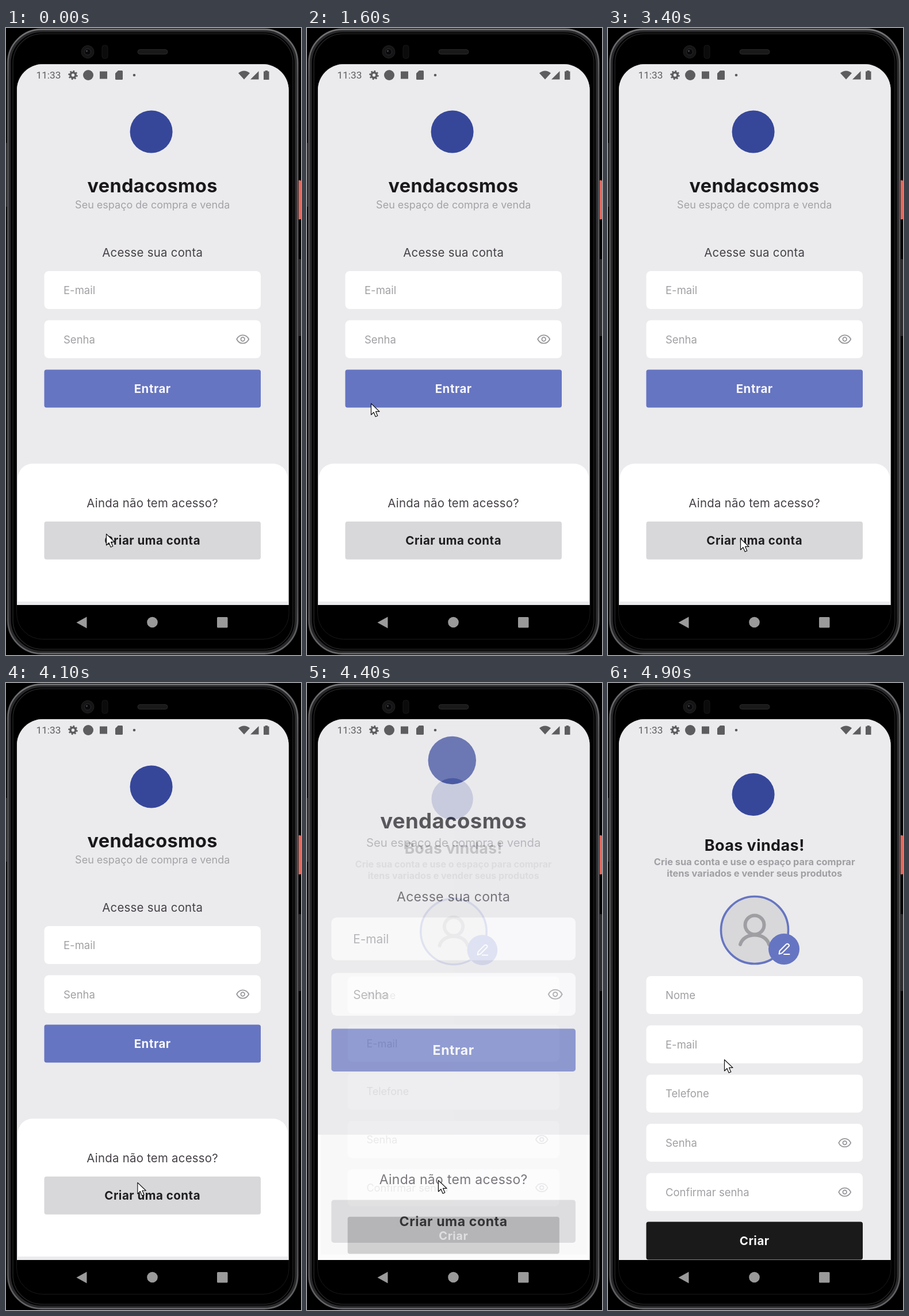
Write an HTML page that moves like this. It is 513x1091 px and loops after 5 s.

```html
<!DOCTYPE html>
<html lang="pt-BR">
<head>
<meta charset="utf-8">
<title>Login</title>
<style>
  html, body { margin: 0; width: 100%; height: 100%; overflow: hidden; background: #000; }
  svg { display: block; width: 100%; height: 100%; }
  text { font-family: Inter, sans-serif; }
  .mid { text-anchor: middle; }
  .title { font-size: 32.5px; font-weight: 700; letter-spacing: .3px; fill: #1a181b; }
  .sub { font-size: 18px; fill: #a3a2a6; }
  .lead { font-size: 20.4px; letter-spacing: .25px; fill: #454147; }
  .hint { font-size: 18.5px; fill: #a09fa3; }
  .btn { font-size: 20.5px; font-weight: 700; letter-spacing: .5px; }
  .hello { font-size: 27px; font-weight: 700; letter-spacing: .4px; fill: #1a181b; }
  .note { font-size: 16.4px; font-weight: 700; fill: #a09fa3; }
  .clock { font-family: Roboto, sans-serif; font-size: 17.2px; }
</style>
</head>
<body>
<svg id="stage" viewBox="0 0 513 1091" preserveAspectRatio="none">
  <defs>
    <clipPath id="glass"><path d="M19 1004V108a45 45 0 0 1 45-45H446.500a45 45 0 0 1 45 45V1004Z"/></clipPath>
    <linearGradient id="rim" x2="0" y2="1">
      <stop offset="0" stop-color="#77777a"/>
      <stop offset=".08" stop-color="#58585b"/>
      <stop offset=".92" stop-color="#505053"/>
      <stop offset="1" stop-color="#6a6a6d"/>
    </linearGradient>
  </defs>

  <!-- phone body -->
  <rect width="513" height="1091"/>
  <rect x="0" y="200" width="2.5" height="111" fill="#2c2c2e"/>
  <rect x="508" y="265" width="5" height="68" rx="1.5" fill="#e8675a"/>
  <rect x="508.5" y="402" width="4.5" height="134" rx="1.5" fill="#2c2c2e"/>
  <g fill="none">
    <rect x="5" y="4" width="500.500" height="1083" rx="57" stroke="#29292b" stroke-width="7"/>
    <rect x="3.500" y="2.500" width="503.500" height="1086" rx="58" stroke="url(#rim)" stroke-width="2.400"/>
    <rect x="12" y="10" width="487" height="1071" rx="51" stroke="#222224" stroke-width="1.500"/>
    <rect x="18.500" y="62.500" width="473.500" height="1001" rx="45" stroke="#19191b"/>
  </g>
  <circle cx="142" cy="41.500" r="11" fill="#151516" stroke="#202021"/>
  <circle cx="142" cy="41.500" r="5.500" fill="#09090b" stroke="#2c2c2f"/>
  <circle cx="140.500" cy="40" r="1.500" fill="#48484c"/>
  <rect x="167" y="30" width="10" height="23" rx="4" fill="#0b0b0c" stroke="#171718"/>
  <rect x="229" y="37.500" width="52" height="8" rx="4" fill="#19191a" stroke="#2a2a2b"/>

  <g clip-path="url(#glass)">
    <rect x="19" y="63" width="473" height="942" fill="#ebebed"/>
    <g id="login"></g>
    <g id="signup"></g>
  </g>

  <!-- status bar -->
  <g fill="#5d5d60">
    <text class="clock" x="52.500" y="88">11:33</text>
    <g fill="none" stroke="#5d5d60">
      <circle cx="116.500" cy="82" r="4.500" stroke-width="3.600"/>
      <circle cx="116.500" cy="82" r="7" stroke-width="2.400" pathLength="16" stroke-dasharray="1"/>
    </g>
    <circle cx="143" cy="82" r="9"/>
    <rect x="163" y="75.500" width="13" height="13"/>
    <path d="M195 74h6.500q1.500 0 1.500 1.500v13q0 1.500-1.500 1.500h-10q-1.500 0-1.500-1.500V79Z"/>
    <circle cx="223" cy="82" r="2.300"/>
    <path d="M404 78.500q10-8 20 0L414 89.500Z"/>
    <path d="M439.500 75v14.500H425Z"/>
    <path d="M450.500 75.500V74h4.500v1.500h2.500V90h-9.500V75.500Z"/>
  </g>

  <!-- navigation bar -->
  <g fill="#9a9a9b">
    <path d="M122.500 1034.500 140.500 1024.500V1044.500Z"/>
    <circle cx="254.500" cy="1034" r="9.300"/>
    <rect x="367" y="1025" width="18.500" height="18.500" rx="1.500"/>
  </g>

  <path id="cursor" d="M.5.5V20L5 15.700 8.200 23.300 11.800 21.800 8.600 14.400H15Z" fill="#fff" stroke="#111" stroke-width="1.200" stroke-linejoin="round"/>
</svg>
<script>
const $ = id => document.getElementById(id);
const MID = 254.7;

const box = (y, fill, r) =>
  `<rect x="66.500" y="${y}" width="376.500" height="66" rx="${r}" fill="${fill}"/>`;
const mid = (cls, y, str) => `<text class="mid ${cls}" x="${MID}" y="${y}">${str}</text>`;
const button = (y, fill, ink, str) =>
  box(y, fill, 4) + `<text class="mid btn" x="${MID}" y="${y + 40.7}" fill="${ink}">${str}</text>`;
const eye = y => `<g transform="translate(411.700 ${y})" fill="none" stroke="#98979b" stroke-width="1.800">
  <path d="M-10.500 0C-6-9.500 6-9.500 10.500 0C6 9.500-6 9.500-10.500 0Z"/><circle r="3.300"/></g>`;
const field = (y, str, secret) =>
  box(y, '#fff', 8) + `<text class="hint" x="100" y="${y + 40}">${str}</text>` +
  (secret ? eye(y + 33) : '');
const badge = y => `<circle cx="252.600" cy="${y}" r="37" fill="#36479a"/>`;
const page = `<rect x="19" y="63" width="473" height="942" fill="#ebebed"/>`;

$('login').innerHTML = page +
  badge(180.5) +
  mid('title', 286, 'vendacosmos') +
  mid('sub', 314, 'Seu espaço de compra e venda') +
  mid('lead', 398, 'Acesse sua conta') +
  field(423, 'E-mail') +
  field(508.5, 'Senha', true) +
  button(594.5, '#6675c2', '#f7f7f8', 'Entrar') +
  `<path d="M20.500 998V784a26 26 0 0 1 26-26H464a26 26 0 0 1 26 26V998Z" fill="#fff"/>` +
  mid('lead', 834, 'Ainda não tem acesso?') +
  button(858.7, '#d8d8da', '#1f1d20', 'Criar uma conta');

const hints = ['Nome', 'E-mail', 'Telefone', 'Senha', 'Confirmar senha'];
$('signup').innerHTML = page +
  badge(194) +
  mid('hello', 292, 'Boas vindas!') +
  mid('note', 316.5, 'Crie sua conta e use o espaço para comprar') +
  mid('note', 336.5, 'itens variados e vender seus produtos') +
  `<circle cx="255" cy="430" r="58.500" fill="#d8d8da" stroke="#6675c2" stroke-width="3.600"/>
   <g fill="none" stroke="#9f9fa3" stroke-width="6" stroke-linecap="round">
     <circle cx="255" cy="421" r="16.500"/>
     <path d="M230 455C236 433 274 433 280 455"/>
   </g>
   <circle cx="306" cy="463" r="27" fill="#6675c2"/>
   <path d="M297.500 471.500 298.500 466 310 454.500Q312.500 453 314.200 455T314 458.500L302.500 470ZM306 472H315.500" fill="none" stroke="#fff" stroke-width="2" stroke-linecap="round" stroke-linejoin="round"/>` +
  hints.map((h, i) => field(510 + i * 85.7, h, i > 2)).join('') +
  button(937.5, '#1a1a1b', '#f7f7f8', 'Criar');

// [ms, x, y] of the pointer tip
const path = [
  [0, 174, 880], [300, 152, 1040], [600, 132, 928], [1200, 108, 700], [1600, 111, 653],
  [1800, 150, 793], [2200, 226, 880], [2400, 230, 886], [2500, 230, 888], [3600, 230, 888],
  [4200, 228, 865], [4500, 228, 865], [4700, 218, 805], [4800, 212, 741], [4900, 202, 655]
];
// [ms, progress of the screen change, opacity of the old screen, opacity of the new one]
const fade = [
  [0, 0, 1, 0], [4200, 0, 1, 0], [4300, .15, 1, 0],
  [4400, .853, .86, .19], [4500, .98, 0, 1], [4600, 1, 0, 1]
];

function at(table, t) {
  const i = table.findIndex(row => row[0] > t);
  if (i < 0) return table[table.length - 1].slice(1);
  const a = table[i - 1], b = table[i], k = (t - a[0]) / (b[0] - a[0]);
  return a.slice(1).map((v, j) => v + (b[j + 1] - v) * k);
}

function show(id, scale, alpha) {
  $(id).setAttribute('transform', `translate(255 540) scale(${scale}) translate(-255 -540)`);
  $(id).setAttribute('opacity', alpha);
}

const LOOP = 5000, TICK = 100;
const start = performance.now();

function draw(now) {
  const t = Math.floor((Math.max(0, now - start) % LOOP) / TICK) * TICK;
  const [x, y] = at(path, t), [p, old, fresh] = at(fade, t);
  $('cursor').setAttribute('transform', `translate(${x} ${y})`);
  show('login', 1 + .15 * p, old);
  show('signup', .85 + .15 * p, fresh);
  requestAnimationFrame(draw);
}
draw(start);
</script>
</body>
</html>
```
